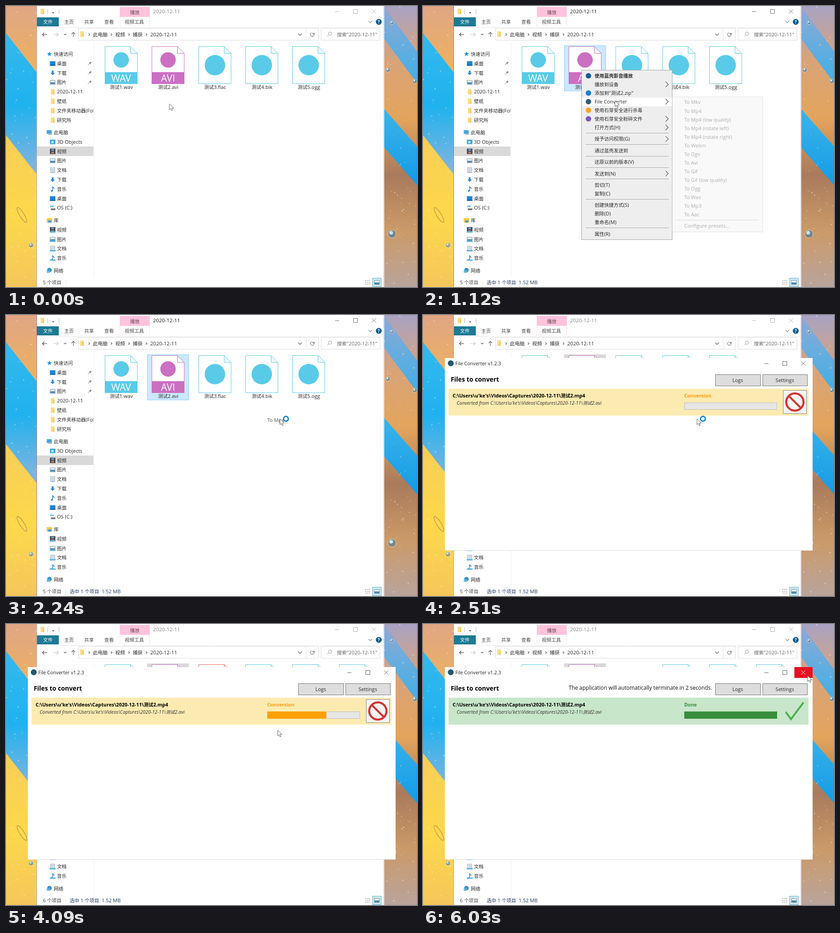
Recreate the animation shown at these times as an HTML page with a canvas. Size 903 by 620 pixels, loop 6.13 s.

```html
<!DOCTYPE html>
<html lang="zh-CN">
<head>
<meta charset="utf-8">
<title>File Converter</title>
<style>
html, body { margin: 0; width: 100%; height: 100%; overflow: hidden; background: #fff; }
canvas { display: block; }
</style>
</head>
<body>
<canvas id="stage" width="903" height="620"></canvas>
<script>
const c = document.getElementById('stage').getContext('2d');
const LOOP = 6130, TICK = LOOP / 66;
const CYAN = '#59cbe8', PINK = '#cb6fc2', RED = '#e2635a', BLUE = '#2b84d4', GREEN = '#388e3c';
const LATIN = '"Open Sans", "Noto Sans", sans-serif';
const CJK = '"Noto Sans CJK SC", "Noto Sans CJK JP", "Noto Sans CJK", sans-serif';

// Moments of the story, in ms
const ACTIVATE = 360, MENU_OPEN = 550, SUBMENU_OPEN = 1110, PICK = 2220, WINDOW_OPEN = 2410,
  FILE_ADDED = 3060, DONE = 4920, COUNTDOWN = 5010, CLOSE_HOVER = 5940;

const ramp = (t, a, b) => Math.min(1, Math.max(0, (t - a) / (b - a)));
const mix = (a, b, k) => a + (b - a) * k;

// Each move: start, end, target position; the pointer rests in between
const MOVES = [[0, 370, 348, 141], [800, 1115, 422, 209], [1115, 1480, 549, 211], [1480, 1780, 602, 229],
  [3600, 4080, 597, 234], [5380, 6030, 845, 114]];
function pointerAt(t) {
  let x = 359, y = 216;
  for (const [a, b, tx, ty] of MOVES) {
    const k = ramp(t, a, b);
    x = mix(x, tx, k);
    y = mix(y, ty, k);
  }
  return [x, y];
}
// Fast start, slow middle, then the rest
const progress = t => 110 * ramp(t, 2790, 3530) + 20 * ramp(t, 3600, 4080) + 50 * ramp(t, 4480, 4740);

function rect(x, y, w, h, fill, stroke) {
  if (fill) { c.fillStyle = fill; c.fillRect(x, y, w, h); }
  if (stroke) { c.strokeStyle = stroke; c.lineWidth = 1; c.strokeRect(x + .5, y + .5, w - 1, h - 1); }
}
function poly(pts, fill, stroke, width = 1, open) {
  c.beginPath();
  for (let i = 0; i < pts.length; i += 2) c.lineTo(pts[i], pts[i + 1]);
  if (!open) c.closePath();
  if (fill) { c.fillStyle = fill; c.fill(); }
  if (stroke) { c.strokeStyle = stroke; c.lineWidth = width; c.stroke(); }
}
const line = (pts, color, width = 1) => poly(pts, null, color, width, true);
const hline = (x, x2, y, color) => line([x, y, x2, y], color);
const vline = (x, y, y2, color) => line([x, y, x, y2], color);
function disc(x, y, r, fill, stroke, width = 1) {
  c.beginPath();
  c.arc(x, y, r, 0, 7);
  if (fill) { c.fillStyle = fill; c.fill(); }
  if (stroke) { c.strokeStyle = stroke; c.lineWidth = width; c.stroke(); }
}
// Arrow head at (x, y), turned by quarter turns: 0 right, 1 down, 2 left, 3 up; tail adds a shaft
function arrow(x, y, turn, r, color = '#555', tail = 0) {
  c.save();
  c.translate(x, y);
  c.rotate(turn * Math.PI / 2);
  line([-r, -r, 0, 0, -r, r], color, 1.1);
  if (tail) line([0, 0, -tail, 0], color, 1.1);
  c.restore();
}
// Mixed Chinese and Latin text; y is the middle of the line
function text(s, x, y, color = '#2a2a2a', size = 11, style = '', center) {
  const runs = s.match(/[\u3000-\u9fff]+|[^\u3000-\u9fff]+/g).map(run => {
    const han = run.charCodeAt(0) >= 0x3000;
    const font = `${style} ${han ? size * .955 : size}px ${han ? CJK : LATIN}`;
    c.font = font;
    return { run, font, w: c.measureText(run).width };
  });
  if (center) x -= runs.reduce((sum, r) => sum + r.w, 0) / 2;
  c.fillStyle = color;
  for (const r of runs) {
    c.font = r.font;
    c.fillText(r.run, x, y + size * .36);
    x += r.w;
  }
}
const label = (s, x, y, color, size, style) => text(s, x, y, color, size, style, true);
function windowButtons(x, y, color, closeColor = color) {
  hline(x, x + 9, y + .5, color);
  rect(x + 40, y - 5, 10, 10, null, color);
  line([x + 81, y - 4.5, x + 90, y + 4.5], closeColor);
  line([x + 90, y - 4.5, x + 81, y + 4.5], closeColor);
}

function fade(y, y2, ...colors) {
  const g = c.createLinearGradient(0, y, 0, y2);
  colors.forEach((k, i) => g.addColorStop(i / (colors.length - 1), k));
  return g;
}
// Slanted band across one edge strip; `drop` is how far it falls to the right
const band = (x, y, h, drop, fill) => poly([x, y, x + 74, y + drop, x + 74, y + drop + h, x, y + h], fill);
function wallpaper() {
  rect(0, 0, 74, 620, fade(0, 620, '#e0a684', '#efb25c', '#f8cf55', '#fdd84a', '#f3c75c'));
  band(0, 60, 225, 95, fade(60, 380, '#35b9ee', '#1fb2ee', '#8fb4dc'));
  rect(829, 0, 74, 620, fade(0, 620, '#a9a3c4', '#d9a377', '#e3a45c', '#a97a5c', '#cb9a68', '#b9a49c'));
  band(829, 0, 70, 100, fade(0, 170, '#8fa9d6', '#3fb0e6'));
  band(829, 225, 85, 85, fade(225, 395, '#3cb4ea', '#149ce6'));
  let seed = 7;
  const rnd = () => (seed = seed * 16807 % 2147483647) / 2147483647;
  for (let i = 0; i < 150; i++)
    disc(rnd() * 74 + (i % 2 ? 829 : -5), rnd() * 620, .4 + rnd(), 'rgba(255,245,230,.55)');
  for (const [x, y, r] of [[839, 141, 5], [848, 37, 4], [898, 166, 5], [848, 503, 9], [55, 528, 5]]) {
    disc(x, y, r, 'rgba(70,120,155,.6)', '#dfd5bd');
    disc(x - r * .2, y - r * .3, r * .45, '#c9e4ee');
  }
  c.beginPath();
  c.ellipse(35, 461, 5, 19, -.55, 0, 7);
  c.strokeStyle = '#b98d55';
  c.lineWidth = 1.2;
  c.stroke();
}

// Small icons, drawn around (0, 0)
const sheet = (fill, edge) => rect(-5, -6, 10, 12, fill, edge);
const screen = (fill, edge) => rect(-6, -5, 12, 10, fill, edge);
const ICONS = {
  star() {
    const pts = [];
    for (let i = 0; i < 10; i++) {
      const r = i % 2 ? 2.5 : 6, a = i * Math.PI / 5;
      pts.push(r * Math.sin(a), -r * Math.cos(a));
    }
    poly(pts, '#2798d8');
  },
  desk() { screen('#1b86d8'); rect(-6, 3, 12, 2, '#0d5ca5'); },
  down() { rect(-2, -5, 4, 5, BLUE); poly([-5, 0, 5, 0, 0, 5], BLUE); },
  pic() { screen('#e9f2f8', '#8999a5'); rect(-5, 0, 10, 4, '#4a89b3'); },
  folder() { rect(-4, -6, 8, 12, '#fddc83'); rect(1, -2, 3, 8, '#f6cc62'); },
  pc() { rect(-6, -5, 11, 8, '#4ba3d8'); hline(-3, 6, 4.5, '#68747c'); },
  cube() { screen('#35a9dc'); rect(-3, -2, 5, 5, '#c8eefb'); },
  film() { rect(-6, -6, 12, 12, '#414450'); rect(-3, -5, 6, 4, '#739cc9'); rect(-3, 1, 6, 4, '#b98156'); },
  doc() { sheet('#fff', '#8795a0'); for (let y = -2.5; y < 5; y += 3) hline(-3, 3, y, '#5e8fb5'); },
  note() { line([0, 4, 0, -5, 4, -1], BLUE, 1.6); disc(-2, 4, 2, BLUE); },
  disk() { rect(-5, -5, 3, 3, '#2aa6df'); rect(-1, -5, 3, 3, '#2aa6df'); rect(-4, 1, 10, 4, '#747b80'); },
  lib() { screen('#f6c84b'); rect(-3, 0, 7, 5, '#4d9fd4'); },
  net() { disc(0, -1, 5, '#3c91c9'); rect(-6, 0, 7, 5, '#69b8df'); }
};
// Groups of "icon label"; the first entry of each is the heading
const NAV = [
  ['star 快速访问', 'desk 桌面', 'down 下载', 'pic 图片', 'folder 2020-12-11', 'folder 壁纸', 'folder 文件夹移动器(Folder', 'folder 研究所'],
  ['pc 此电脑', 'cube 3D Objects', 'film 视频', 'pic 图片', 'doc 文档', 'down 下载', 'note 音乐', 'desk 桌面', 'disk OS (C:)'],
  ['lib 库', 'film 视频', 'pic 图片', 'doc 文档', 'note 音乐'],
  ['net 网络']];
function icon(name, x, y) {
  c.save();
  c.translate(x, y);
  ICONS[name]();
  c.restore();
}
function pin(x, y) {
  line([x - 4, y + 4, x, y], '#84898d');
  line([x - 2, y - 2, x + 2, y + 2], '#84898d');
  line([x, y, x + 3, y - 3], '#84898d', 3);
}
function navigation() {
  rect(68, 310, 124, 21, '#d9d9d9');
  c.save();
  c.beginPath();
  c.rect(68, 80, 124, 520);
  c.clip();
  let y = 106;
  NAV.forEach((group, g) => {
    group.forEach((entry, i) => {
      const cut = entry.indexOf(' '), indent = i ? 7 : 0;
      icon(entry.slice(0, cut), 95.5 + indent, y);
      if (g === 2 && i) rect(89 + indent, y + 3, 13, 3, '#5fb4e2');
      text(entry.slice(cut + 1), 105 + indent, y);
      if (!g && i > 0 && i < 4) pin(184, y);
      y += 20.8;
    });
    y += 6.7;
  });
  c.restore();
  vline(193.5, 80, 598, '#eeeeee');
}

function page(i, name, color, tag) {
  const x = 217.5 + 103 * i, y = 89.5;
  poly([x, y, x + 56, y, x + 71, y + 15, x + 71, y + 82, x, y + 82], '#fff', color);
  poly([x + 56, y, x + 56, y + 15, x + 71, y + 15], '#f3fbfd', color);
  disc(x + 35.5, y + (tag ? 29.5 : 41), tag ? 17 : 22.5, color);
  if (tag) {
    rect(x - .5, 146, 72, 26, color);
    label(tag, x + 35.5, 159, '#fff', 21);
  }
  label(name, x + 36, 179);
}
function files(t) {
  if (t >= MENU_OPEN) rect(310, 87, 92, 101, t < WINDOW_OPEN ? '#cce8ff' : '#d9d9d9', t < WINDOW_OPEN && '#99d1ff');
  else if (t >= 270) rect(310, 87, 92, 101, '#e5f3ff');
  const added = t >= FILE_ADDED;
  page(0, '测试1.wav', CYAN, 'WAV');
  page(1, '测试2.avi', PINK, 'AVI');
  if (added && t < 5560) page(2, '测试2.mp4', RED, 'MP4');
  ['测试3.flac', '测试4.bik', '测试5.ogg'].forEach((n, i) => page(i + 2 + added, n, CYAN));
}

function titleBar(active) {
  icon('folder', 80, 12);
  vline(91.5, 7, 18, '#bbb');
  vline(116.5, 7, 18, '#bbb');
  poly([101.5, 14, 106, 14, 103.7, 16.5], '#333');
  rect(250, 2, 66, 22, '#ffc3dd');
  label('播放', 283, 14, '#6c4354');
  vline(250.5, 24, 45, '#fbdfeb');
  vline(315.5, 24, 45, '#fbdfeb');
  text('2020-12-11', 323, 12, active ? '#222' : '#888', 11.4);
  windowButtons(723, 12, active ? '#777' : '#b5b5b5');
  rect(68, 25, 48, 20, '#1d7a94');
  label('文件', 92, 35, '#fff');
  ['主页', '共享', '查看'].forEach((s, i) => text(s, 128 + 44 * i, 35, '#444'));
  text('视频工具', 261, 35, '#444');
  arrow(800.5, 37, 1, 4, '#888');
  disc(819, 35, 6.5, '#0b5b92');
  label('?', 819, 35, '#fff', 10, 'bold');
  hline(68, 829, 47.5, '#e6e6e6');
}
function addressBar() {
  arrow(80, 63, 2, 4, '#444', 10);
  arrow(115, 63, 0, 4, '#c4c4c4', 10);
  arrow(130, 64, 1, 2.5);
  arrow(148, 58, 3, 4, '#555', 10);
  rect(159, 49, 528, 27, null, '#dcdcdc');
  vline(659.5, 50, 75, '#e4e4e4');
  icon('folder', 167, 62);
  let x = 191;
  for (const s of ['此电脑', '视频', '捕获', '2020-12-11']) {
    arrow(x - 7, 63, 0, 2.5);
    text(s, x, 63, '#2a2a2a', 11.3);
    x += 10.5 * s.length + 17.5;
  }
  arrow(646, 65, 1, 4);
  c.beginPath();
  c.arc(673, 63, 4, -.6, 4.5);
  c.strokeStyle = '#555';
  c.stroke();
  arrow(676, 62, 1, 2.5);
  rect(692, 49, 130, 27, null, '#dcdcdc');
  disc(712, 61, 3.5, null, '#999');
  line([709.5, 63.5, 706, 67], '#999');
  text('搜索"2020-12-11"', 727, 63, '#666', 11.2);
}
function statusBar(t) {
  text((t < 2690 ? 5 : 6) + ' 个项目', 81, 610.5, '#444');
  vline(131.5, 604, 617, '#eee');
  if (t >= MENU_OPEN) text('选中 1 个项目  1.52 MB', 140, 610.5, '#1e395b');
  for (let i = 0; i < 9; i++) rect(789 + i % 3 * 4, 605 + (i / 3 | 0) * 4, 3, 1, '#888');
  rect(805, 600, 20, 20, '#cde8f4', '#65b3d3');
  icon('pic', 815, 610);
}
function explorer(t) {
  const active = t >= ACTIVATE && t < WINDOW_OPEN;
  rect(67, 0, 764, 620, '#fff');
  vline(67.5, 0, 620, active ? '#b0708c' : '#b9a3ad');
  vline(829.5, 0, 620, '#d9c9cf');
  titleBar(active);
  addressBar();
  navigation();
  files(t);
  statusBar(t);
}

// Groups of [label, icon colour]; ">" marks a submenu
const MENU = [
  [['使用蓝壳影音播放', '#155a9c'], ['播放到设备>'], ['添加到"测试2.zip"', '#1b7fd0'], ['File Converter>', '#2d5d7d'],
    ['使用石芽安全进行杀毒', '#f6a623'], ['使用石芽安全粉碎文件>', '#7a55c0'], ['打开方式(H)>']],
  [['授予访问权限(G)>']], [['通过蓝壳发送到']], [['还原以前的版本(V)']], [['发送到(N)>']],
  [['剪切(T)'], ['复制(C)']], [['创建快捷方式(S)'], ['删除(D)'], ['重命名(M)']], [['属性(R)']]];
const FORMATS = ['Mkv', 'Mp4', 'Mp4 (low quality)', 'Mp4 (rotate left)', 'Mp4 (rotate right)', 'Webm', 'Ogv', 'Avi',
  'Gif', 'Gif (low quality)', 'Ogg', 'Wav', 'Mp3', 'Aac'];

function contextMenu(t, py) {
  const focus = t >= SUBMENU_OPEN ? 211 : py;
  rect(348, 141, 200, 375, '#eeeeee', '#a5a5a5');
  let y = 154;
  MENU.forEach((group, g) => {
    if (g) {
      hline(357, 540, Math.round(y - 12.5) - .5, '#a8a8a8');
    }
    group.forEach(([name, color], i) => {
      if (t >= 910 && Math.abs(y - focus) < 9.5) rect(350, y - 9, 197, 19, '#fff');
      text(name.replace('>', ''), 377, y, '#2a2a2a', 11, g + i ? '' : 'bold');
      if (name.endsWith('>')) arrow(539, y, 0, 6);
      if (color) disc(363.5, y, 6, color);
      y += 19;
    });
    y += 6.4;
  });
}
function submenu(t, py) {
  rect(547, 200, 200, 299, '#eeeeee', '#b5b5b5');
  FORMATS.forEach((f, i) => {
    const y = 212.5 + i * 19.05;
    if (t >= 1550 && Math.abs(y - py) < 9.5) rect(549, y - 9, 196, 19, '#fff');
    text('To ' + f, 574, y);
  });
  hline(554, 738, 472.5, '#a8a8a8');
  text('Configure presets...', 574, 485.5);
}
function menus(t, py) {
  if (t >= PICK) {
    if (t < PICK + TICK) text('To Mp4', 574, 232, '#555');
    return;
  }
  if (t >= MENU_OPEN) {
    c.globalAlpha = mix(.4, 1, ramp(t, MENU_OPEN, 710));
    contextMenu(t, py);
  }
  if (t >= SUBMENU_OPEN) {
    c.globalAlpha = mix(.35, 1, ramp(t, SUBMENU_OPEN, 1390));
    submenu(t, py);
  }
  c.globalAlpha = 1;
}

function button(s, x, w) {
  rect(x, 131, w, 26, '#dddddd', '#777');
  label(s, x + w / 2 - .5, 144);
}
function job(t) {
  const done = t >= DONE, path = "C:\\Users\\u'ke's\\Videos\\Captures\\2020-12-11\\测试2.";
  rect(56, 162.5, 791, 59.5, done ? '#c8e6c9' : '#fcebb1');
  text(path + 'mp4', 65, 178, '#000', 10.8, 'bold');
  text('Converted from ' + path + 'avi', 74, 194, '#333', 10.4, 'italic');
  text(done ? 'Done' : 'Conversion', 574, 178, done ? GREEN : '#ff9c0a', 10.6, 'bold');
  rect(574, 193, 204, 16, '#e6e6e6', '#c0c0c0');
  rect(574, 193, done ? 204 : progress(t), 16, done ? GREEN : '#ffa000');
  if (done) {
    line([797, 194, 808.5, 210, 836, 173], '#4caf50', 4);
  } else {
    rect(791, 166, 52, 52, '#f5f5f5', '#8a8a8a');
    disc(817, 192, 19, null, '#d63434', 4.5);
    line([803.5, 178.5, 830.5, 205.5], '#d63434', 4.5);
  }
}
function converter(t) {
  if (t < WINDOW_OPEN) return;
  const open = ramp(t, WINDOW_OPEN - TICK, WINDOW_OPEN + TICK), scale = mix(.94, 1, open);
  const hot = t >= CLOSE_HOVER;
  c.save();
  c.globalAlpha = open;
  c.translate(452, 307);
  c.scale(scale, scale);
  c.translate(-452, -307);
  rect(48, 95, 808, 425, '#fff');
  hline(48, 856, 519.5, '#ddd');
  disc(61, 106.5, 6.5, '#24566f');
  text('File Converter v1.2.3', 71, 107, '#222', 10.6);
  if (hot) rect(816, 95, 40, 24, '#e81123');
  windowButtons(750, 107, '#666', hot ? '#fff' : '#666');
  text('Files to convert', 61, 142, '#000', 13.85, 'bold');
  if (t >= COUNTDOWN) {
    const left = 3 - Math.floor((t - COUNTDOWN) / 1000);
    text(`The application will automatically terminate in ${left} seconds.`, 320, 141, '#111', 11.85);
  }
  button('Logs', 642, 100);
  button('Settings', 746, 99);
  job(t);
  c.restore();
}

function pointer(x, y, busy) {
  const shape = [0, 0, 0, 13, 3, 10.2, 5, 15, 7.2, 14, 5.2, 9.5, 9.5, 9.5];
  poly(shape.map((v, i) => v + (i % 2 ? y : x)), '#fff', '#666');
  if (busy) disc(x + 13, y, 5.2, '#fff', '#1685d9', 3);
}

function draw(now) {
  const t = Math.floor((now % LOOP + 8) / TICK) % 66 * TICK;
  const [x, y] = pointerAt(t);
  wallpaper();
  explorer(t);
  menus(t, y);
  converter(t);
  pointer(x, y, t >= PICK && t < 2600);
}
const start = performance.now();
function step() {
  draw(performance.now() - start);
  requestAnimationFrame(step);
}
step();
</script>
</body>
</html>
```
